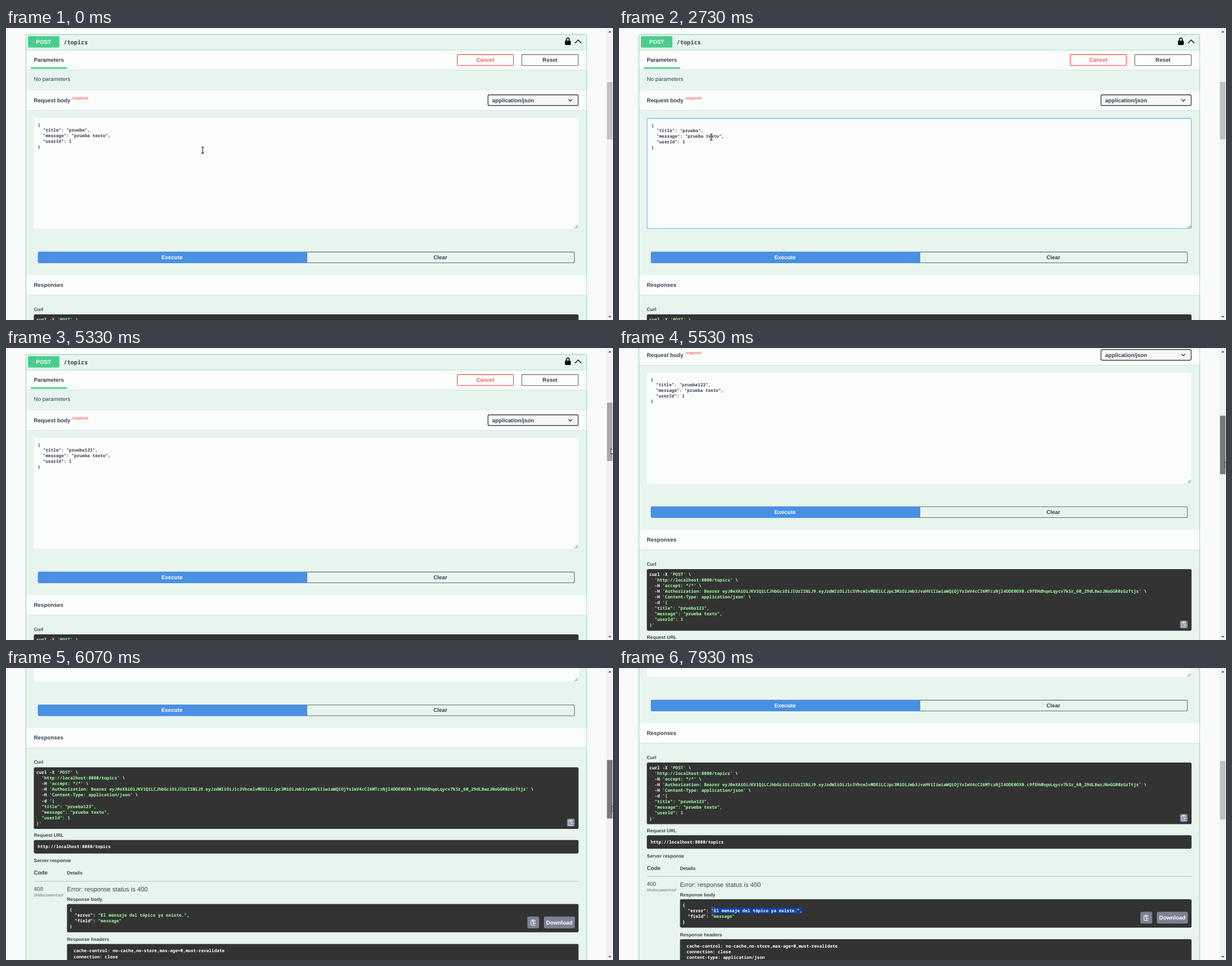
Animation, 1080 px wide and 519 px high, one loop 8 s. Source, as an HTML page:

```html
<!DOCTYPE html>
<html lang="es">
<head>
<meta charset="utf-8">
<title>POST /topics</title>
<style>
html, body { margin: 0; width: 100%; height: 100%; overflow: hidden; background: #fafafa; }
svg { display: block; width: 100vw; height: 100vh; }
text { font: 700 9.84px "Liberation Sans", Arial, sans-serif; fill: #3b4151; white-space: pre; text-rendering: geometricPrecision; }
.mid { text-anchor: middle; }
.plain { font-weight: 400; }
.small { font-size: 8.44px; }
.mono { font: 700 7.73px "Noto Sans Mono", "DejaVu Sans Mono", monospace; }
.white { fill: #fff; }
.green { fill: #a2fca2; }
.dark { fill: #333; }
.band { fill: #fff; fill-opacity: .8; }
.rule { fill: #000; fill-opacity: .09; }
.line { fill: none; stroke: #808387; stroke-width: 1.4; }
.grey { fill: #7d8293; }

/* One loop is 8 s, so 1% is 80 ms. */
#page, #thumb, #json, #focus, #caret, #caret2, #digits, #tail, #pointer, #ibeam, #arrow, #hand, #picked, #glow {
  animation: 8s linear infinite;
}
#page { animation-name: scroll; }
#thumb { animation-name: thumb, grip; animation-timing-function: linear, step-end; }
#pointer { animation-name: move; }
#picked { animation-name: pick; }
#json, #focus, #caret, #caret2, #digits, #tail, #ibeam, #arrow, #hand, #glow { animation-timing-function: step-end; }
#json { animation-name: nudge; }
#focus { animation-name: focus; }
#caret { animation-name: blink; }
#caret2 { animation-name: blink2, type; }
#tail { animation-name: type; }
#digits { animation-name: reveal; }
#ibeam { animation-name: ibeam; }
#arrow { animation-name: arrow; }
#hand { animation-name: hand; }
#glow { animation-name: hand; }

@keyframes scroll {
  0%, 67.9% { transform: translateY(0); }
  70.875% { transform: translateY(-279px); }
  73.375% { transform: translateY(-312px); }
  75.875% { transform: translateY(-332.5px); }
  78.375%, 100% { transform: translateY(-341px); }
}
@keyframes thumb {
  0%, 57.4% { y: 96px; height: 102px; }
  57.5%, 67.9% { y: 97px; height: 104px; }
  70.875% { y: 153px; height: 104px; }
  73.375% { y: 159.5px; height: 104px; }
  75.875% { y: 163.5px; height: 104px; }
  78.375%, 100% { y: 165.3px; height: 104px; }
}
@keyframes grip {
  0% { fill: #c1c1c1; }
  66.25% { fill: #a8a8a8; }
  67.7% { fill: #787878; }
  79% { fill: #a8a8a8; }
  80%, 100% { fill: #c1c1c1; }
}
@keyframes move {
  0%, .875% { transform: translate(350px, 217px); }
  5.875%, 8.375% { transform: translate(168px, 190px); }
  15% { transform: translate(143px, 172px); }
  16.6%, 18.375% { transform: translate(144px, 178px); }
  20%, 22.5% { transform: translate(146px, 180px); }
  25%, 28.375% { transform: translate(144px, 181px); }
  37.5%, 44.4% { transform: translate(176px, 201px); }
  49.1% { transform: translate(831px, 225px); }
  50% { transform: translate(698px, 313px); }
  55.6%, 60.9% { transform: translate(430px, 408px); }
  66.6% { transform: translate(1076px, 178px); }
  67.9% { transform: translate(1078px, 178px); }
  70.875% { transform: translate(1078px, 234px); }
  73.375% { transform: translate(1078px, 240px); }
  75.875% { transform: translate(1078px, 244.5px); }
  78.375%, 79.1% { transform: translate(1078px, 246px); }
  87.5% { transform: translate(314px, 433px); }
  88.4%, 90% { transform: translate(326px, 432px); }
  98.75%, 100% { transform: translate(167.5px, 431px); }
}
@keyframes nudge { 0%, 56.25%, 100% { transform: none; } 15.9% { transform: translate(1px, 1px); } }
@keyframes focus { 0%, 56.25%, 100% { visibility: hidden; } 15.9% { visibility: visible; } }
@keyframes blink { 0%, 22.5%, 100% { visibility: hidden; } 15.9% { visibility: visible; } }
@keyframes blink2 {
  0%, 30.9%, 51%, 100% { visibility: hidden; }
  24.25%, 37.5% { visibility: visible; }
}
@keyframes type {
  0% { transform: none; }
  40% { transform: translateX(4.64px); }
  42% { transform: translateX(9.28px); }
  44.3%, 100% { transform: translateX(13.92px); }
}
@keyframes reveal {
  0% { clip-path: inset(0 100% 0 0); }
  40% { clip-path: inset(0 66.7% 0 0); }
  42% { clip-path: inset(0 33.3% 0 0); }
  44.3%, 100% { clip-path: inset(0); }
}
@keyframes pick {
  0%, 90% { clip-path: inset(0 0 0 100%); animation-timing-function: steps(35); }
  98.4%, 100% { clip-path: inset(0); }
}
@keyframes ibeam { 0%, 85.6%, 100% { visibility: visible; } 53% { visibility: hidden; } }
@keyframes arrow { 0%, 55%, 85.6%, 100% { visibility: hidden; } 53%, 62% { visibility: visible; } }
@keyframes hand { 0%, 62%, 100% { visibility: hidden; } 55% { visibility: visible; } }
</style>
</head>
<body>
<svg viewBox="0 0 1080 519" preserveAspectRatio="none">
  <defs>
    <g id="clip" fill="none" stroke="#fff" stroke-width="1">
      <path d="M3 -1V-4.2H-3.8V4.6H3V3.4M5 1.2H-.5M1.2 -.6L-.7 1.2L1.2 3"/>
      <path d="M-2 -4.4H1.3M-2 -2H1.2" stroke-width="1.4"/>
    </g>
  </defs>

  <g id="page">
    <rect x="35.4" y="11.4" width="997.6" height="1000" rx="2.8" fill="#e7f5ee" stroke="#7fd6ae"/>

    <!-- Operation summary -->
    <rect x="35" y="38.8" width="998" height=".8" fill="#7fd6ae"/>
    <rect x="39" y="14.5" width="56" height="20.3" rx="2" fill="#49cc90"/>
    <text class="mid white" x="67" y="28">POST</text>
    <text class="mono" x="102.5" y="28.6" style="font-size:10.31px">/topics</text>
    <path d="M996.9 23V20.6a2.7 2.7 0 0 1 5.4 0V23" fill="none" stroke="#000" stroke-width="1.6"/>
    <rect x="994.6" y="22.6" width="10.2" height="7.6" rx="1.2"/>
    <path d="M1012.3 27L1018 21.2L1023.7 27" fill="none" stroke="#111" stroke-width="1.5"/>

    <!-- Parameters -->
    <rect class="band" x="36" y="39.6" width="996.6" height="34.6"/>
    <rect class="rule" x="36" y="74.2" width="996.6" height="1"/>
    <text x="49.5" y="59.8">Parameters</text>
    <rect x="44" y="69.8" width="64.5" height="2.8" fill="#49cc90"/>
    <rect class="line" x="803" y="47.2" width="99.8" height="19.4" rx="1.5" style="stroke:#ff6060"/>
    <text class="mid" x="852.8" y="60.2" style="fill:#ff6060">Cancel</text>
    <rect class="line" x="917.6" y="47.2" width="100.6" height="19.4" rx="1.5"/>
    <text class="mid" x="968" y="60.2">Reset</text>
    <text class="plain" x="49.5" y="94">No parameters</text>

    <!-- Request body -->
    <rect class="band" x="36" y="111" width="996.6" height="35.2"/>
    <rect class="rule" x="36" y="146.2" width="996.6" height="1"/>
    <text x="49.5" y="131.8">Request body</text>
    <text x="118" y="127.4" style="font-size:7.03px;fill:#ff6561">required</text>
    <rect class="line" x="857.6" y="118.8" width="160.4" height="19" rx="2.4" style="fill:#f7f7f7;stroke:#41444e"/>
    <text x="865" y="131.8">application/json</text>
    <path d="M1000.8 126.8L1004 130L1007.2 126.8" fill="none" stroke="#222" stroke-width="1.3"/>

    <rect x="49.5" y="160" width="969" height="196.7" fill="#fbfdfc"/>
    <rect id="focus" x="50" y="160.6" width="968.3" height="195.6" rx="1.5" fill="none" stroke="#61affe" stroke-width="1.1"/>
    <path d="M1011.8 356L1017.4 350.4M1014.8 356L1017.4 353.4" stroke="#444" stroke-width=".9"/>
    <g id="json">
      <text class="mono" x="56.5" y="174.6">{</text>
      <text class="mono" x="65.8" y="184.3">"title": "prueba</text>
      <text class="mono" id="digits" x="140" y="184.3">123</text>
      <text class="mono" id="tail" x="140" y="184.3">",</text>
      <text class="mono" x="65.8" y="194">"message": "prueba texto",</text>
      <text class="mono" x="65.8" y="203.8">"userId": 1</text>
      <text class="mono" x="56.5" y="213.5">}</text>
      <rect id="caret" x="61.2" y="167.4" width=".8" height="9" fill="#222"/>
      <rect id="caret2" x="140.2" y="177.2" width=".8" height="9" fill="#222"/>
    </g>

    <!-- Buttons -->
    <rect id="glow" x="57" y="397.6" width="478" height="20.4" style="filter:drop-shadow(0 0 1.5px rgba(0,0,0,.3))" fill="#4990e2"/>
    <path d="M535 397.6H59a2.4 2.4 0 0 0 -2.4 2.4V415.6a2.4 2.4 0 0 0 2.4 2.4H535Z" fill="#4990e2"/>
    <text class="mid white" x="295.4" y="411">Execute</text>
    <path class="line" d="M535.3 398.2H1009a2.4 2.4 0 0 1 2.4 2.4V415a2.4 2.4 0 0 1 -2.4 2.4H535.3Z"/>
    <text class="mid" x="772.7" y="411">Clear</text>

    <!-- Responses -->
    <rect class="band" x="36" y="439" width="996.6" height="35.4"/>
    <rect class="rule" x="36" y="474.4" width="996.6" height="1"/>
    <text x="49.5" y="460">Responses</text>
    <text class="small" x="49.5" y="503">Curl</text>
    <rect class="dark" x="49.5" y="509" width="969.2" height="109.5" rx="2.8"/>
    <g>
      <text class="mono white" x="54" y="520.6">curl -X <tspan class="green">'POST'</tspan> \</text>
      <text class="mono white" x="63.3" y="530.7"><tspan class="green">'http://localhost:8080/topics'</tspan> \</text>
      <text class="mono white" x="63.3" y="540.8">-H <tspan class="green">'accept: */*'</tspan> \</text>
      <text class="mono white" x="63.3" y="550.9">-H <tspan class="green">'Authorization: Bearer eyJ0eXAiOiJKV1QiLCJhbGciOiJIUzI1NiJ9.eyJzdWIiOiJ1c3VhcmlvMDEiLCJpc3MiOiJmb3JvaHViIiwiaWQiOjYsImV4cCI6MTczNjI4ODE0OX0.c9fEHdhqeLqycv7kSr_60_29dL8wzJNoGGR0zGzTtjs'</tspan> \</text>
      <text class="mono white" x="63.3" y="561">-H <tspan class="green">'Content-Type: application/json'</tspan> \</text>
      <text class="mono white" x="63.3" y="571.1">-d <tspan class="green">'{</tspan></text>
      <text class="mono green" x="63.3" y="581.2">"title": "prueba123",</text>
      <text class="mono green" x="63.3" y="591.3">"message": "prueba texto",</text>
      <text class="mono green" x="63.3" y="601.4">"userId": 1</text>
      <text class="mono green" x="54" y="611.5">}'</text>
    </g>
    <rect class="grey" x="998" y="600.4" width="14" height="14" rx="2.4"/>
    <use href="#clip" x="1005" y="607.4"/>

    <text class="small" x="49.5" y="633">Request URL</text>
    <rect class="dark" x="49.5" y="638.2" width="969.2" height="24" rx="2.8"/>
    <text class="mono white" x="56.5" y="653">http://localhost:8080/topics</text>

    <text class="small" x="49.8" y="677.6">Server response</text>
    <text x="49.5" y="700">Code</text>
    <text class="small" x="108.5" y="700">Details</text>
    <rect x="49.5" y="711.2" width="969.2" height=".8" fill="#aab6b2"/>
    <text class="plain" x="49.5" y="728.4">400</text>
    <text class="mono" x="49.3" y="738.4" style="font-size:7.15px;font-style:italic;fill:#909a97">Undocumented</text>
    <text class="plain" x="108.5" y="729.6" style="font-size:11.25px">Error: response status is 400</text>

    <text class="small" x="108.5" y="746.8">Response body</text>
    <rect class="dark" x="108.5" y="752" width="910.2" height="50.4" rx="2.8"/>
    <text class="mono white" x="113" y="764.6">{</text>
    <text class="mono white" x="122.3" y="774.6">"error": <tspan class="green">"El mensaje del tópico ya existe."</tspan>,</text>
    <text class="mono white" x="122.3" y="784.7">"field": <tspan class="green">"message"</tspan></text>
    <text class="mono white" x="113" y="794.8">}</text>
    <g id="picked">
      <rect x="164" y="766.8" width="162.4" height="10.2" fill="#0b41a8"/>
      <text class="mono white" x="164" y="774.6">"El mensaje del tópico ya existe.",</text>
    </g>
    <rect class="grey" x="927.6" y="774.2" width="21" height="21" rx="2.8"/>
    <use href="#clip" x="938" y="785"/>
    <rect class="grey" x="957" y="774.2" width="55.2" height="21" rx="2.8"/>
    <text class="mid white" x="984.6" y="788.4">Download</text>

    <text class="small" x="108.5" y="817.8">Response headers</text>
    <rect class="dark" x="108.5" y="823" width="910.2" height="110" rx="2.8"/>
    <text class="mono white" x="120.3" y="838">cache-control: no-cache,no-store,max-age=0,must-revalidate</text>
    <text class="mono white" x="120.3" y="848.1">connection: close</text>
    <text class="mono white" x="120.3" y="858.2">content-type: application/json</text>
  </g>

  <rect width="1069" height="1" fill="#000" fill-opacity=".09"/>

  <!-- Scrollbar -->
  <rect x="1068.6" width="11.4" height="519" fill="#f1f1f1"/>
  <path d="M1071.6 8H1077L1074.3 5ZM1071.6 512H1077L1074.3 515Z" fill="#505050"/>
  <rect id="thumb" x="1069.3" y="96" width="9.8" height="102" fill="#c1c1c1"/>

  <g id="pointer">
    <g id="ibeam" fill="none">
      <path d="M-2.5 -5.2H-.8L0 -4.6L.8 -5.2H2.5M0 -4.6V4.8M-2.5 5.4H-.8L0 4.8L.8 5.4H2.5" stroke="#fff" stroke-opacity=".6" stroke-width="2"/>
      <path d="M-2.5 -5.2H-.8L0 -4.6L.8 -5.2H2.5M0 -4.6V4.8M-2.5 5.4H-.8L0 4.8L.8 5.4H2.5" stroke="#111" stroke-width="1.1"/>
    </g>
    <path id="arrow" d="M.4 .4V10.8L2.8 8.6L4.4 12.2L6.1 11.4L4.6 7.9H7.8Z" fill="#fff" stroke="#111" stroke-width=".8"/>
    <path id="hand" d="M-1 6V.8a1 1 0 0 1 2 0V4.4L6 5.4a1.2 1.2 0 0 1 1 1.2V9.6L5.6 13H-.4L-3.8 8.4a1 1 0 0 1 1.4 -1.4L-1 8.2Z" fill="#fff" stroke="#111" stroke-width=".8"/>
  </g>
</svg>
</body>
</html>
```
